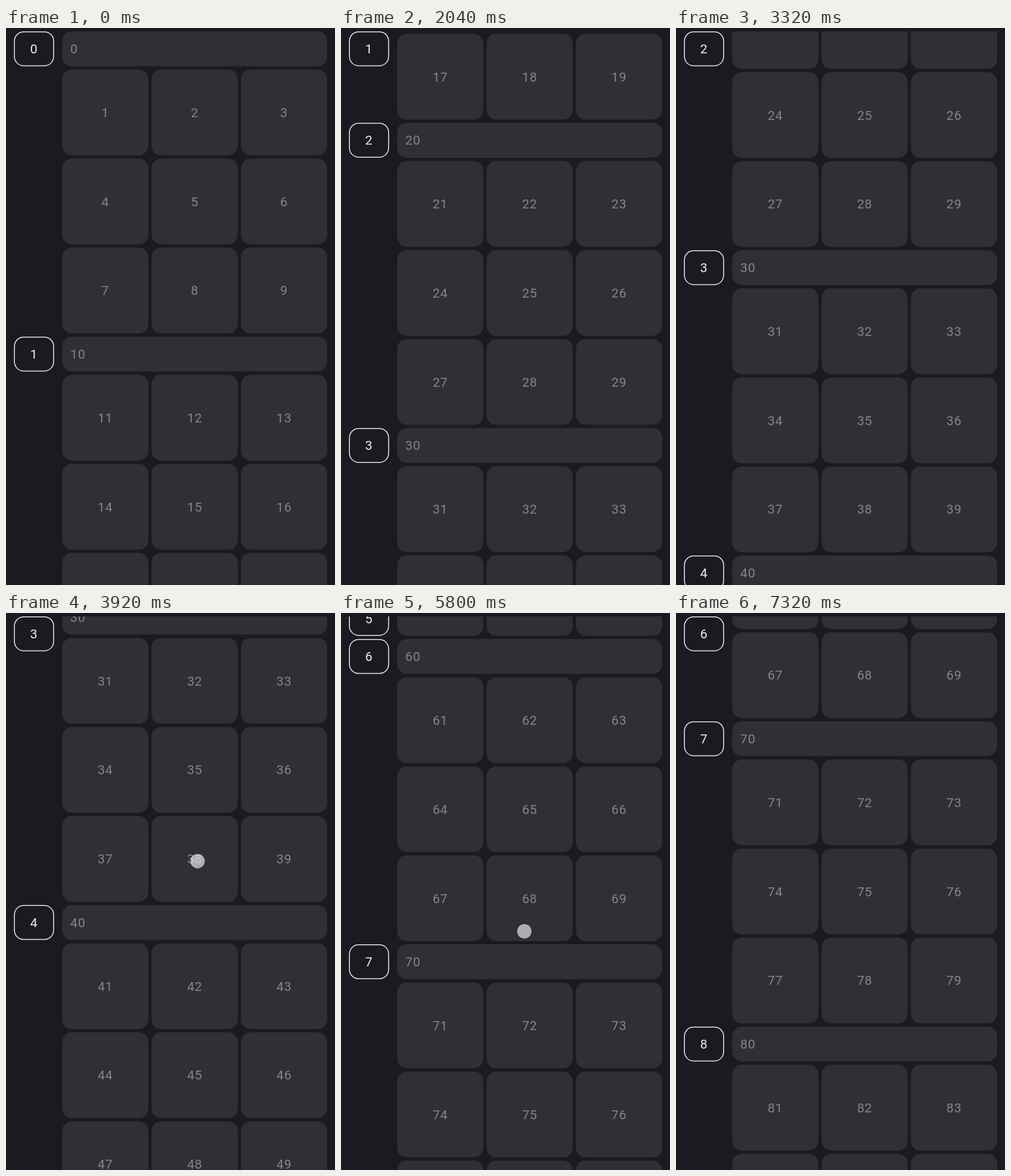
Write an HTML page with a canvas that moves like this. It is 480 px wide and 812 px high and loops after 8.08 s.

```html
<!DOCTYPE html>
<html lang="en">
<head>
<meta charset="utf-8">
<title>Sticky labels</title>
<style>
  html, body { margin: 0; width: 100%; height: 100%; overflow: hidden; background: #1c1920; }
  canvas { display: block; width: 480px; height: 812px; }
</style>
</head>
<body>
<canvas></canvas>
<script>
const WIDTH = 480, HEIGHT = 812, LOOP = 8080, STEP = 40;
const TOP = 5, LEFT = 82, GAP = 4.7;
const CELL_W = 125.7, CELL_H = 125.1, HEADER_W = 386.5, HEADER_H = 50.7;
const COL_PITCH = CELL_W + GAP, ROW_PITCH = CELL_H + GAP, HEADER_PITCH = 55.6;
const SECTION_H = HEADER_PITCH + 3 * ROW_PITCH;

// Each swipe drags the list from one offset to another, then flings it to rest.
const swipes = [
  { start: 1160, release: 1440, rest: 3040, from: 0, drag: 230, to: 1016, power: 1.7, x: 278, y: 697 },
  { start: 3552, release: 3960, rest: 5110, from: 1016, drag: 409, to: 2424, power: 1.7, x: 279.5, y: 705 },
  { start: 5314, release: 5840, rest: 7080, from: 2424, drag: 236, to: 2962, power: 1.3, x: 267.5, y: 677 },
];

const canvas = document.querySelector('canvas');
const ctx = canvas.getContext('2d');
const ratio = window.devicePixelRatio || 1;
canvas.width = WIDTH * ratio;
canvas.height = HEIGHT * ratio;

function poseAt(time) {
  const swipe = swipes.filter(s => s.start <= time).pop();
  if (!swipe) return { scroll: 0 };
  const { start, release, rest, from, drag, to, power, x, y } = swipe;
  if (time <= release) {
    const moved = drag * ((time - start) / (release - start)) ** power;
    return { scroll: from + moved, touch: { x, y: y - moved } };
  }
  const left = Math.max(0, (rest - time) / (rest - release));
  return { scroll: to - (to - from - drag) * left ** 2.36 };
}

function roundRect(x, y, w, h, radius) {
  ctx.beginPath();
  ctx.roundRect(x, y, w, h, radius);
}

function text(value, x, middle, color, align = 'center') {
  ctx.fillStyle = color;
  ctx.textAlign = align;
  ctx.fillText(value, x, middle + 6.7);
}

function tile(number, x, y, w, h, isHeader) {
  if (y > HEIGHT || y + h < TOP) return;
  roundRect(x, y, w, h, 14);
  ctx.fillStyle = '#312e36';
  ctx.fill();
  text(number, isHeader ? x + 11.8 : x + w / 2, y + h / 2, '#87848b', isHeader ? 'left' : 'center');
}

function label(number, y) {
  if (y > HEIGHT || y + HEADER_H < TOP) return;
  roundRect(12.3, y + 0.6, 57.2, HEADER_H - 1.2, 13.5);
  ctx.strokeStyle = '#f0eff2';
  ctx.lineWidth = 1.3;
  ctx.stroke();
  text(number, 40.9, y + HEADER_H / 2, '#f0eff2');
}

function section(index, scroll) {
  const y = TOP + index * SECTION_H - scroll;
  if (y > HEIGHT || y + SECTION_H < TOP) return;
  tile(index * 10, LEFT, y, HEADER_W, HEADER_H, true);
  for (let i = 0; i < 9; i++) {
    const row = Math.floor(i / 3);
    tile(index * 10 + i + 1, LEFT + (i % 3) * COL_PITCH, y + HEADER_PITCH + row * ROW_PITCH, CELL_W, CELL_H);
  }
  // The label sticks to the top until the next section pushes it out.
  label(index, Math.min(Math.max(y, TOP), y + SECTION_H - HEADER_PITCH));
}

function pointer({ x, y }) {
  ctx.beginPath();
  ctx.arc(x, y, 10, 0, 2 * Math.PI);
  ctx.fillStyle = 'rgba(240, 240, 245, 0.65)';
  ctx.fill();
  ctx.strokeStyle = 'rgba(215, 215, 228, 0.6)';
  ctx.lineWidth = 1.2;
  ctx.stroke();
}

function draw(time) {
  const { scroll, touch } = poseAt(time);
  ctx.setTransform(ratio, 0, 0, ratio, 0, 0);
  ctx.fillStyle = '#1c1920';
  ctx.fillRect(0, 0, WIDTH, HEIGHT);
  ctx.font = '18.7px Roboto, sans-serif';
  ctx.letterSpacing = '0.58px';
  ctx.save();
  ctx.beginPath();
  ctx.rect(0, TOP, WIDTH, HEIGHT - TOP);
  ctx.clip();
  for (let index = 0; index < 10; index++) section(index, scroll);
  ctx.restore();
  if (touch) pointer(touch);
}

const origin = performance.now();
function frame() {
  const elapsed = (performance.now() - origin) % LOOP;
  draw(Math.floor(elapsed / STEP) * STEP);
  requestAnimationFrame(frame);
}
frame();
</script>
</body>
</html>
```
